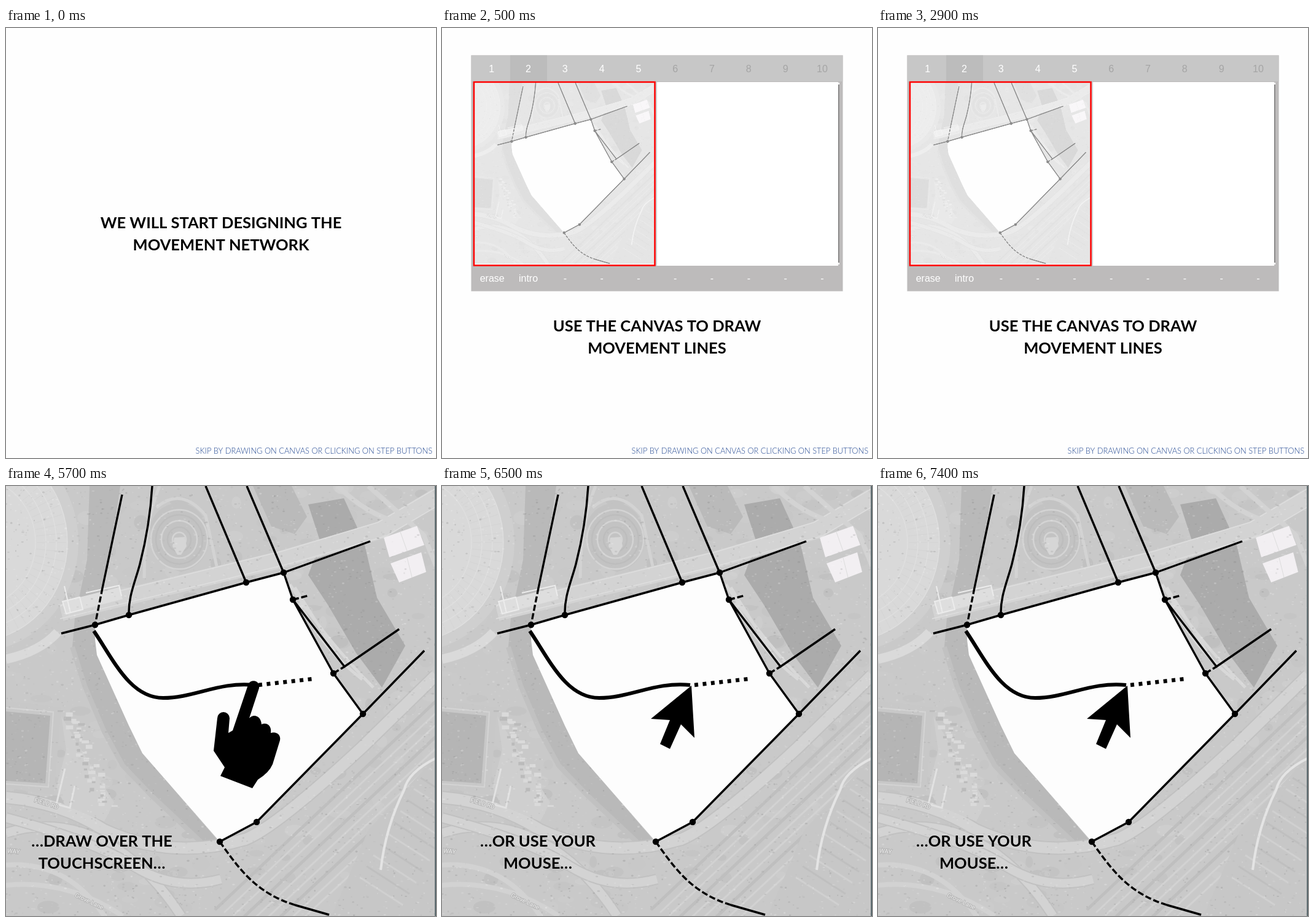
Recreate the animation shown at these times as an HTML page with a canvas. Size 700 px wide and 700 px high, loop 8000 ms.

```html
<!DOCTYPE html>
<html lang="en">
<head>
<meta charset="utf-8">
<title>Movement network guide</title>
<style>
html, body { margin: 0; width: 100%; height: 100%; overflow: hidden; background: #fff; }
canvas { display: block; }
</style>
</head>
<body>
<canvas id="stage" width="700" height="700"></canvas>
<script>
const SIZE = 700;
const LOOP = 8000;
const HEADING = 'bold 25.5px Lato, sans-serif';
const ctx = document.getElementById('stage').getContext('2d');

function seeded(seed) {
  return () => (seed = (seed * 16807) % 2147483647) / 2147483647;
}

function fill(c, path, color) {
  c.fillStyle = color;
  c.fill(new Path2D(path));
}

function stroke(c, path, color, width, dash = []) {
  c.strokeStyle = color;
  c.lineWidth = width;
  c.setLineDash(dash);
  c.stroke(new Path2D(path));
  c.setLineDash([]);
}

function ring(c, x, y, rx, ry, color, width) {
  c.beginPath();
  c.ellipse(x, y, rx, ry, 0, 0, Math.PI * 2);
  c.strokeStyle = color;
  c.lineWidth = width;
  c.stroke();
}

function disc(c, x, y, rx, ry, color) {
  c.beginPath();
  c.ellipse(x, y, rx, ry, 0, 0, Math.PI * 2);
  c.fillStyle = color;
  c.fill();
}

function write(c, text, x, y, font, color, align = 'center') {
  c.font = font;
  c.fillStyle = color;
  c.textAlign = align;
  c.fillText(text, x, y);
}

function heading(lines, x, y) {
  lines.forEach((line, i) => write(ctx, line, x, y + i * 36, HEADING, '#000'));
}

function speckle(c, count, size, alpha, seed) {
  const rnd = seeded(seed);
  for (let i = 0; i < count; i++) {
    const tone = rnd() < 0.5 ? 255 : 120;
    const color = `rgba(${tone},${tone},${tone},${alpha * rnd()})`;
    disc(c, rnd() * SIZE, rnd() * SIZE, size * (0.5 + rnd()), size * (0.4 + rnd() * 0.6), color);
  }
}

function drawStadium(c) {
  disc(c, -50, 92, 168, 178, '#cfcfcf');
  disc(c, -50, 92, 150, 160, '#d9d9d9');
  for (let i = 0; i < 64; i++) {
    const a = i * Math.PI / 32;
    stroke(c, `M${-50 + 100 * Math.cos(a)} ${92 + 108 * Math.sin(a)}L${-50 + 148 * Math.cos(a)} ${92 + 158 * Math.sin(a)}`, '#d4d4d4', 1);
  }
  [150, 132, 115, 98].forEach(r => ring(c, -50, 92, r, r * 1.07, '#e0e0e0', 1.2));
  stroke(c, 'M0 282Q55 270 84 238', '#dadada', 15);
}

function drawWater(c) {
  fill(c, 'M136 0L186 0L168 120L147 220L148 275L200 390L222 435L345 577L318 580L238 505L190 455L160 400L128 325L108 262L112 215L132 120Z', '#b9b9b9');
  stroke(c, 'M108 262L128 325L160 400L190 455L238 505L318 580', '#c1c1c1', 8);
  fill(c, 'M402 0L465 0L490 50L470 78L432 66Z', '#bababa');
  fill(c, 'M492 30L550 20L583 92L604 182L650 260L612 328L570 272L525 195L492 145L512 92Z', '#ababab');
  stroke(c, 'M462 160Q520 250 598 328M478 190Q510 260 580 315M470 165L545 285', '#d8d8d8', 5);
}

function drawPlaza(c) {
  fill(c, 'M236 60Q250 25 290 28Q330 40 330 90Q325 130 285 140Q245 128 236 95Z', '#c3c3c3');
  [46, 38, 29, 19, 11].forEach((r, i) => ring(c, 282, 87, r, r * 1.05, i % 2 ? '#bdbdbd' : '#d4d4d4', 2.5));
  fill(c, 'M271 98L274 84L291 83L294 98L285 112L279 112Z', '#d6d6d6');
  stroke(c, 'M250 0Q225 60 225 150M245 35Q285 0 325 48L345 140', '#d3d3d3', 5);
}

function drawRoads(c) {
  stroke(c, 'M90 206L450 119L610 72L700 18', '#d3d3d3', 28);
  stroke(c, 'M90 194L450 106L606 59L700 4M88 216L460 127L620 81L700 34', '#dedede', 1.5);
  stroke(c, 'M540 0Q585 45 640 60M590 0L680 80L700 130', '#d3d3d3', 8);
  fill(c, 'M92 188L184 165L190 184L98 208Z', '#dedede');
  stroke(c, 'M92 188L120 181L125 201L98 208ZM95 163L105 207M130 174L184 162L188 179', '#ececec', 2);

  const roads = ['M0 507Q90 515 160 560Q270 610 390 575Q440 555 580 425L700 308', 'M0 565Q90 535 180 590Q240 630 285 700', 'M0 540Q150 580 210 620Q275 660 350 640'];
  roads.forEach((road, i) => {
    stroke(c, road, '#c1c1c1', i ? 18 : 22);
    stroke(c, road, '#d3d3d3', i ? 14 : 18);
  });
  stroke(c, 'M0 617Q100 610 160 700M0 650Q100 640 190 700', '#d2d2d2', 8);

  for (let i = 0; i < 9; i++) {
    const d = i * 15;
    stroke(c, `M${340 + d} ${690 + d * 0.3}L${700 + d * 0.3} ${350 + d}`, i % 3 ? '#d2d2d2' : '#bfbfbf', i % 3 ? 3 : 5);
  }
}

function drawBlocks(c) {
  fill(c, 'M0 350L90 360L78 503L0 491Z', '#c8c8c8');
  fill(c, 'M0 367L72 374L64 484L0 480Z', '#b5b5b5');
  stroke(c, 'M0 361L77 368L69 490L0 485', '#d4d4d4', 2);
  fill(c, 'M90 375L132 445L176 515L160 546L96 520L82 490L98 430Z', '#cfcfcf');
  const rnd = seeded(73);
  for (let i = 0; i < 45; i++) {
    const t = i / 45;
    c.fillStyle = i % 3 ? '#dadada' : '#bbb';
    c.fillRect(84 + t * 65 + rnd() * 25, 365 + t * 158, 4 + rnd() * 8, 2 + rnd() * 5);
  }
  stroke(c, 'M96 460L82 518L104 524L112 488', '#e2e2e2', 3);
  fill(c, 'M615 84L669 65L681 96L624 116Z M626 126L676 108L684 140L640 157Z', '#f2eff2');
  stroke(c, 'M642 75L653 106M653 117L661 149', '#dcdcdc', 1);

  fill(c, 'M590 560L700 440L700 700L530 700Z', '#c7c7c7');
  for (let i = 0; i < 10; i++) {
    stroke(c, `M${675 - i * 11} ${475 + i * 18}l70 45`, i % 2 ? '#d0d0d0' : '#bfbfbf', 3);
  }
  stroke(c, 'M700 443Q655 465 648 495Q618 555 610 625', '#e4e4e4', 4);
}

function roadLabel(c, text, x, y, angle) {
  c.save();
  c.translate(x, y);
  c.rotate(angle);
  c.lineWidth = 2;
  c.strokeStyle = '#b4b4b4';
  c.font = '10px Roboto, sans-serif';
  c.textAlign = 'center';
  c.strokeText(text, 0, 0);
  write(c, text, 0, 0, c.font, '#eee');
  c.restore();
}

const SITE = 'M145 226L452 141L467 185L533 305L581 371L408 547L348 579L222 435L200 390L148 275L145 250Z';
const NODES = [[145, 226], [200, 210], [391, 157], [452, 141], [467, 185], [533, 305], [581, 371], [408, 547], [348, 579]];
const SOLID = 'M90 240L145 226L200 210L391 157L452 141L593 90' +
  'M189 14L157 166M238 0C235 50 227 92 218 127C210 157 199 180 200 210M325 0L391 157' +
  'M392 0L452 141L467 185L533 305L581 371M467 185L551 294L640 233' +
  'M681 268L581 371L408 547L348 579M470 682L526 698';
const DASHED = 'M157 166L145 226M467 185L494 178M533 305L551 294M348 579C383 629 410 663 470 682';

function drawNetwork(c) {
  fill(c, SITE, '#fdfdfd');
  c.lineJoin = 'round';
  stroke(c, SOLID, '#000', 3.4);
  stroke(c, DASHED, '#000', 3.4, [10, 4]);
  NODES.forEach(([x, y]) => disc(c, x, y, 5.2, 5.2, '#000'));
}

function buildMap() {
  const sheet = document.createElement('canvas');
  sheet.width = sheet.height = SIZE;
  const c = sheet.getContext('2d');
  c.fillStyle = '#c9c9c9';
  c.fillRect(0, 0, SIZE, SIZE);
  speckle(c, 300, 12, 0.1, 11);
  drawStadium(c);
  drawWater(c);
  drawPlaza(c);
  drawRoads(c);
  drawBlocks(c);
  speckle(c, 4000, 1.6, 0.25, 29);
  roadLabel(c, 'FIELD RD', 65, 520, 0.3);
  roadLabel(c, 'WAY', 12, 598, 0.1);
  roadLabel(c, 'Grove Lane', 134, 679, 0.45);
  drawNetwork(c);
  c.fillStyle = '#5c6a6e';
  c.fillRect(698, 0, 2, SIZE);
  return sheet;
}

const map = buildMap();

function box(x, y, w, h, color) {
  ctx.fillStyle = color;
  ctx.fillRect(x, y, w, h);
}

function skipHint() {
  write(ctx, 'SKIP BY DRAWING ON CANVAS OR CLICKING ON STEP BUTTONS', 694, 693, '300 12.8px Lato, sans-serif', '#1f4590', 'right');
}

function drawPanel() {
  box(47.5, 44.5, 605, 384, '#bdbbbb');
  box(47.5, 44.5, 605, 42.5, '#c7c7c7');
  box(111, 44.5, 60, 42.5, '#bcbcbc');
  box(52, 88, 294, 298, '#fff');
  box(350, 88, 295, 299, '#fff');
  box(347.5, 88, 2.5, 299, '#d0d0d0');
  box(645, 92, 1.5, 290, '#777');
  box(644, 89, 3, 3, '#fff');
  box(644, 382, 3, 3, '#fff');

  ctx.drawImage(map, 52.5, 89.3, 294, 295);
  box(52, 88, 294, 298, 'rgba(255,255,255,.55)');
  ctx.strokeStyle = '#f00';
  ctx.lineWidth = 2.5;
  ctx.strokeRect(52, 88, 294.5, 298.5);

  const font = '16px "Liberation Sans", Arial, sans-serif';
  for (let i = 0; i < 10; i++) {
    const x = 80.7 + i * 59.8;
    write(ctx, String(i + 1), x, 71.5, font, i < 5 ? '#fff' : '#a5a5a5');
    write(ctx, ['erase', 'intro'][i] || '-', x + (i ? 0 : 1), 413, font, '#fff');
  }
}

function drawSketch() {
  ctx.drawImage(map, 0, 0);
  stroke(ctx, 'M143 236C175 283 202 345 256 345C306 345 348 318 404 324', '#000', 6);
  stroke(ctx, 'M411 324L499 314', '#000', 6.5, [6, 7.5]);
}

const HAND = 'M394 324A9.3 9.3 0 0 1 412 329L396 378C403 370 415 374 416 388' +
  'C424 384 433 390 431 402C440 399 448 405 446 414L434 453Q428 467 410 478L401 492' +
  'L349 472L356 458L338 431L344 378A10 10 0 0 1 364 378L362 402L369 398Z';
const POINTER = 'M406 325L340 379L371 381L355 420L371 428L389 388L411 410Z';

function introScene() {
  heading(['WE WILL START DESIGNING THE', 'MOVEMENT NETWORK'], 350, 326);
  skipHint();
}

function panelScene() {
  drawPanel();
  heading(['USE THE CANVAS TO DRAW', 'MOVEMENT LINES'], 350, 494);
  skipHint();
}

function touchScene() {
  drawSketch();
  fill(ctx, HAND, '#000');
  heading(['…DRAW OVER THE', 'TOUCHSCREEN…'], 156, 587);
}

function mouseScene() {
  drawSketch();
  fill(ctx, POINTER, '#000');
  heading(['…OR USE YOUR', 'MOUSE…'], 156, 587);
}

const SCENES = [[500, introScene], [4500, panelScene], [6500, touchScene], [LOOP, mouseScene]];
let start;

function frame(now) {
  start ??= now;
  const t = (now - start) % LOOP;
  box(0, 0, SIZE, SIZE, '#fefefe');
  SCENES.find(([end]) => t < end)[1]();
  requestAnimationFrame(frame);
}
requestAnimationFrame(frame);
</script>
</body>
</html>
```
